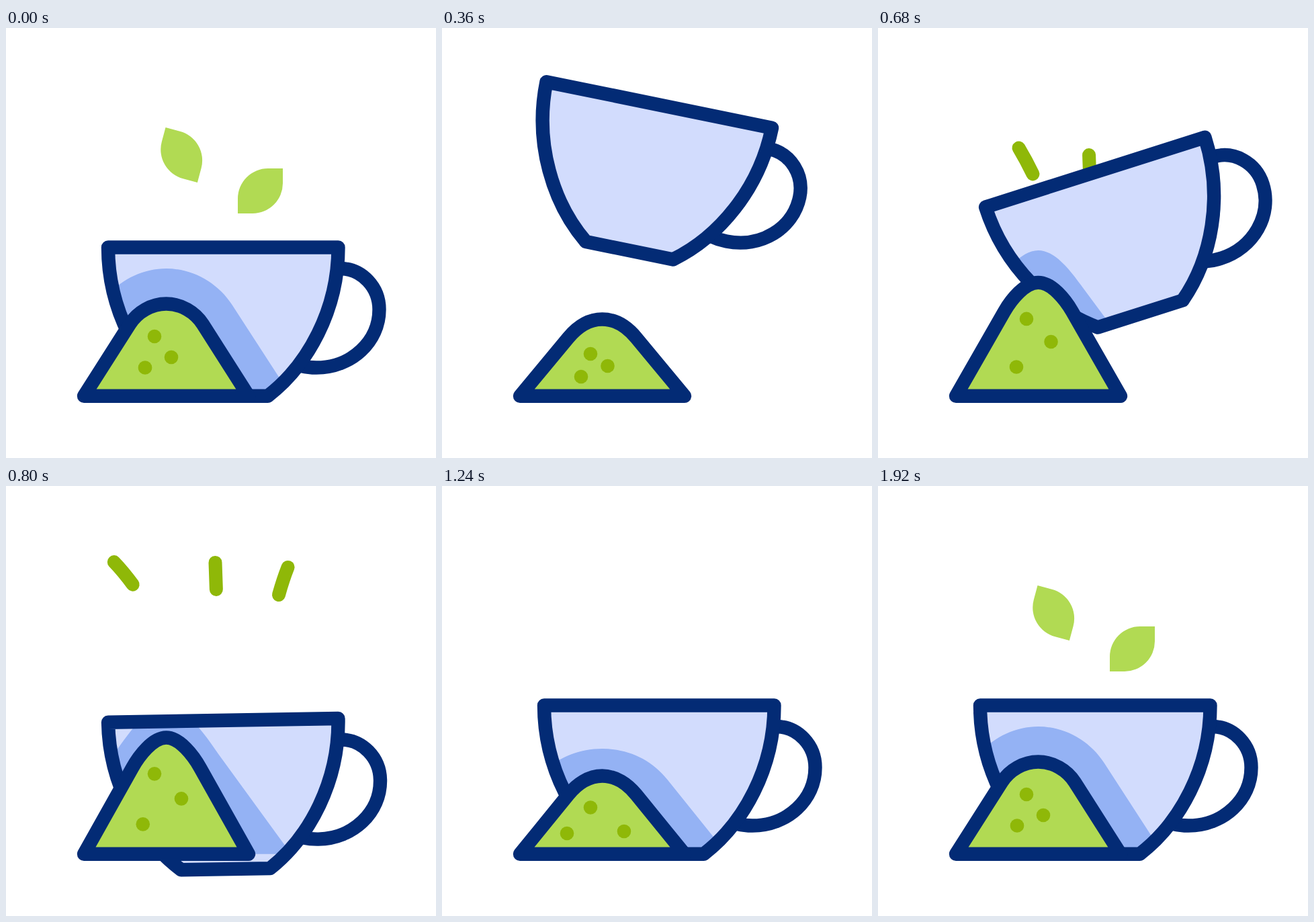
Animation of 640x640 px, one loop 2180 ms. Source, as an HTML page:

```html
<!DOCTYPE html>
<html lang="en">
<head>
<meta charset="utf-8">
<title>Tea cup</title>
<style>
html, body { margin: 0; height: 100%; overflow: hidden; background: #fff; }
svg { display: block; width: 100vw; height: 100vh; }
.line { fill: none; stroke: #032b75; stroke-width: 20.4; stroke-linejoin: round; stroke-linecap: round; }
.spark { fill: none; stroke: #8fb808; stroke-width: 20; stroke-linecap: round; }
</style>
</head>
<body>
<svg viewBox="0 0 640 640">
  <defs>
    <path id="bowl" d="M152 326.5H494.5C494.5 420 449 502 389.5 547.8H257C198 502 152 420 152 326.5Z"/>
    <path id="leaf" d="M-33.5 33.5V11.5A45 45 0 0 1 11.5 -33.5H33.5V-11.5A45 45 0 0 1 -11.5 33.5Z"/>
    <clipPath id="inside"><use href="#bowl" class="cup"/></clipPath>
  </defs>
  <g id="leaves" fill="#b1da53">
    <use href="#leaf" transform="translate(261.2 189) rotate(105)"/>
    <use href="#leaf" transform="translate(378.5 242.5)"/>
  </g>
  <path class="spark" pathLength="1" d="M250 262C212 165 150 77 81 65"/>
  <path class="spark" pathLength="1" d="M317 274L308.5 27"/>
  <path class="spark" pathLength="1" d="M384 290C392 190 425 56 479 54"/>
  <use href="#bowl" class="cup" fill="#d2dcfd"/>
  <g clip-path="url(#inside)"><path id="shade" fill="#94b2f4"/></g>
  <g class="cup line">
    <path d="M494 358H497C530 358 555.5 386 555.5 419C555.5 467 514 505.5 462 505.5Q450 505.5 440 503"/>
    <use href="#bowl"/>
  </g>
  <path id="mound" class="line" style="fill:#b1da53"/>
  <g fill="#8fb808"><circle class="dot" r="10.3"/><circle class="dot" r="10.3"/><circle class="dot" r="10.3"/></g>
</svg>
<script>
const LOOP = 2180, FLOOR = 547.8;
const all = s => [...document.querySelectorAll(s)];
const [leaves, shade, mound] = ['#leaves', '#shade', '#mound'].map(s => document.querySelector(s));
const cups = all('.cup'), sparks = all('.spark'), dots = all('.dot');
const clamp = (t, a, b) => Math.min(1, Math.max(0, (t - a) / (b - a)));

// Eased steps through [time, value] pairs
function steps(t, keys) {
  let i = 1;
  while (i < keys.length - 1 && t > keys[i][0]) i++;
  const [a, v] = keys[i - 1], [b, w] = keys[i];
  const u = clamp(t, a, b);
  return v + (w - v) * u * u * (3 - 2 * u);
}

// Smooth curve through values at shared times, at rest at both ends
const TIMES = [0, 360, 680, 960, 1240, 1560];
function flow(t, v) {
  const last = TIMES.length - 1;
  if (t >= TIMES[last]) return v[last];
  const i = TIMES.findIndex(x => x > t) - 1;
  const slope = k => k % last ? (v[k + 1] - v[k - 1]) / (TIMES[k + 1] - TIMES[k - 1]) : 0;
  const d = TIMES[i + 1] - TIMES[i], u = (t - TIMES[i]) / d, r = 1 - u;
  return r * r * (1 + 2 * u) * v[i] + u * u * (3 - 2 * u) * v[i + 1]
    + u * r * d * (r * slope(i) - u * slope(i + 1));
}

// Symmetric heap: half base, half shoulder width, shoulder height, top
function heap(base, w, y, top) {
  const c = 238.5, h = 0.4 * w, len = Math.hypot(base - w, FLOOR - y);
  const x1 = w - h * (base - w) / len, y1 = y - h * (FLOOR - y) / len;
  return `M${c - base} ${FLOOR}L${c - w} ${y}C${c - x1} ${y1} ${c - h} ${top} ${c} ${top}`
    + `C${c + h} ${top} ${c + x1} ${y1} ${c + w} ${y}L${c + base} ${FLOOR}Z`;
}

function draw(t) {
  const lift = steps(t, [[0, 0], [525, -276], [820, 26], [1120, 0]]);
  const tilt = steps(t, [[0, 0], [280, 15], [540, 0], [685, -17.7], [820, 0]]);
  for (const c of cups) c.setAttribute('transform', `translate(0 ${lift}) rotate(${tilt} 323.5 326.5)`);

  const fall = t < 800 ? steps(t, [[0, 0], [360, 40]])
    : steps(t, [[1240, 190], [1520, -86], [1920, 0]]);
  leaves.setAttribute('transform', `translate(0 ${fall})`);
  leaves.style.display = t > 360 && t < 1240 ? 'none' : '';

  const head = clamp(t, 545, 940), tail = clamp(t, 610, 1003);
  for (const s of sparks) {
    s.style.display = head > tail ? '' : 'none';
    s.style.strokeDasharray = `${head - tail} 3`;
    s.style.strokeDashoffset = -tail;
  }

  const top = flow(t, [410.5, 433.5, 379, 383, 431.5, 410.5]), d = top - 410.5;
  mound.setAttribute('d', heap(122.5, 54.5 - Math.min(4, Math.abs(d) * 0.2),
    top + 30.5 - d * (d < 0 ? 0.4 : 0.13), top));
  shade.setAttribute('d', heap(186, flow(t, [98, 98, 66, 109, 97, 98]),
    flow(t, [412, 432, 386, 440, 437, 412]), flow(t, [358, 385, 331, 340, 391, 358])));

  [
    [221, flow(t, [459, 485, 433, 435.5, 478.5, 459])],
    [flow(t, [246, 246.5, 257.5, 265, 271, 246]), flow(t, [490, 503, 467, 474, 514, 490])],
    [flow(t, [207, 207, 206, 199, 186, 207]), flow(t, [505.5, 519, 504.5, 505.5, 517, 505.5])]
  ].forEach(([x, y], i) => dots[i].setAttribute('transform', `translate(${x} ${y})`));
}

const start = performance.now();
function tick() {
  draw((performance.now() - start) % LOOP);
  requestAnimationFrame(tick);
}
tick();
</script>
</body>
</html>
```
